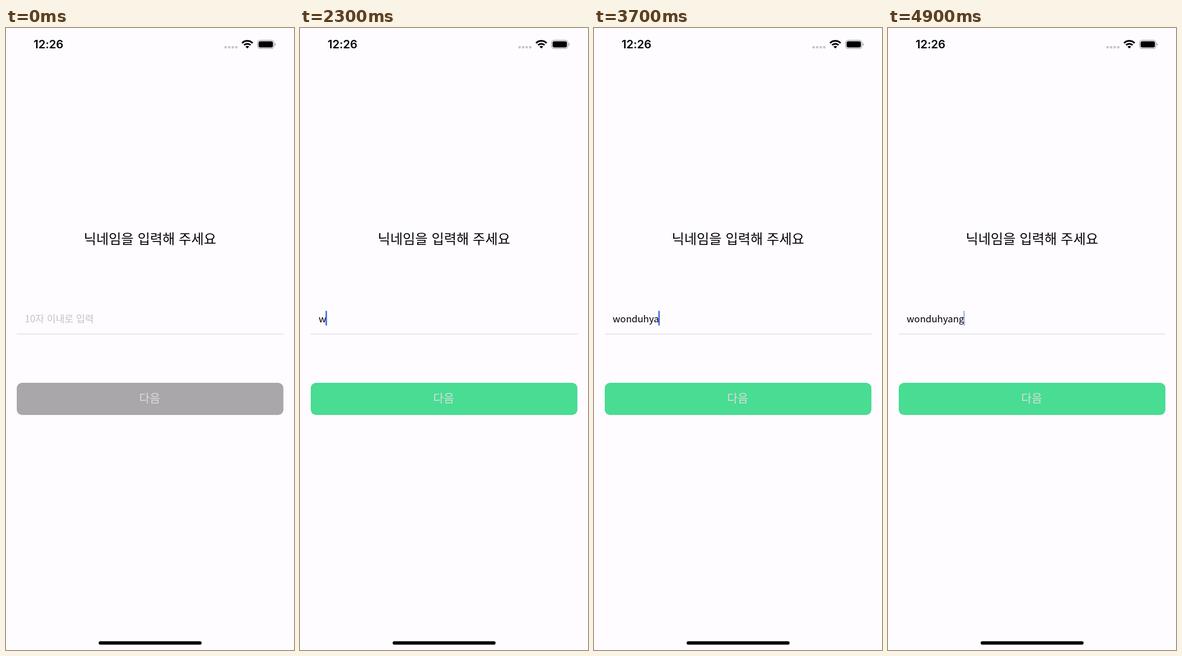
Recreate the animation shown at these times as an HTML page. Size 509 by 1101 pixels, loop 5 s.

```html
<!DOCTYPE html>
<html lang="ko">
<head>
<meta charset="utf-8">
<title>닉네임 입력</title>
<style>
  html, body { margin: 0; width: 100%; height: 100%; overflow: hidden; background: #fefcff; }
  svg { display: block; width: 100%; height: 100%; }
  text { font-family: "Noto Sans CJK KR", "Noto Sans CJK", sans-serif; white-space: pre; }
  .clock { font: 600 20.2px Inter, sans-serif; letter-spacing: -.1px; }
  .mid { text-anchor: middle; }
</style>
</head>
<body>
<svg viewBox="0 0 509 1101">
  <text class="clock mid" x="75" y="36">12:26</text>
  <g fill="#c6c4c8">
    <rect x="386" y="32" width="4.2" height="4.2" rx="1.4"/>
    <rect x="392.3" y="32" width="4.2" height="4.2" rx="1.4"/>
    <rect x="398.6" y="32" width="4.2" height="4.2" rx="1.4"/>
    <rect x="404.9" y="32" width="4.2" height="4.2" rx="1.4"/>
  </g>
  <g fill="none" stroke="#000" stroke-width="3">
    <path d="M417.2 26.7a13 13 0 0 1 18.6 0"/>
    <path d="M420.8 30.3a8 8 0 0 1 11.4 0"/>
    <path d="M426.5 36.3l-3.2-3.2a4.6 4.6 0 0 1 6.4 0z" fill="#000" stroke="none"/>
  </g>
  <rect x="444.6" y="21.6" width="29" height="14.8" rx="4.6" fill="none" stroke="#a5a3a6" stroke-width="1.2"/>
  <rect x="446.4" y="23.4" width="25.4" height="11.2" rx="3"/>
  <path d="M475 26.6q1.8 .6 1.8 2.4t-1.8 2.4z" fill="#a5a3a6"/>

  <text class="mid" x="254.5" y="381.5" font-size="24">닉네임을 입력해 주세요</text>
  <text id="hint" x="33" y="521.3" font-size="17" fill="#c4c2c6">10자 이내로 입력</text>
  <text id="name" x="33" y="521.3" font-size="16.7"></text>
  <rect id="caret" x="33" y="500.5" width="2.6" height="26.2" rx="1.2" fill="#4169e1"/>
  <rect x="19" y="541" width="471.5" height="1.2" fill="#dcdadd"/>
  <rect id="button" x="19" y="628" width="471.3" height="57" rx="9.5"/>
  <text class="mid" x="254" y="663.4" font-size="20" fill="#dedcdf">다음</text>
  <rect x="163.7" y="1085.4" width="182" height="6.2" rx="3.1"/>
</svg>
<script>
const $ = id => document.getElementById(id);
const hint = $('hint'), name = $('name'), caret = $('caret'), button = $('button');
const LOOP = 5000;
const WORD = 'wonduhyang';
const KEYS = [2300, 2500, 3000, 3200, 3400, 3500, 3600, 3700, 3900, 4000];
const BLINK = [[0, 0], [1800, 1], [4500, .5], [4600, 0], [4900, .45]];

function draw(t) {
  const typed = KEYS.filter(k => k <= t).length;
  name.textContent = WORD.slice(0, typed);
  hint.style.display = typed ? 'none' : '';
  button.setAttribute('fill', typed ? '#49dc93' : '#a9a7aa');
  caret.setAttribute('x', typed ? 31.7 + name.getComputedTextLength() : 33);
  caret.setAttribute('opacity', BLINK.filter(b => b[0] <= t).pop()[1]);
}

const start = performance.now();
function tick() {
  draw((performance.now() - start) % LOOP);
  requestAnimationFrame(tick);
}
tick();
</script>
</body>
</html>
```
